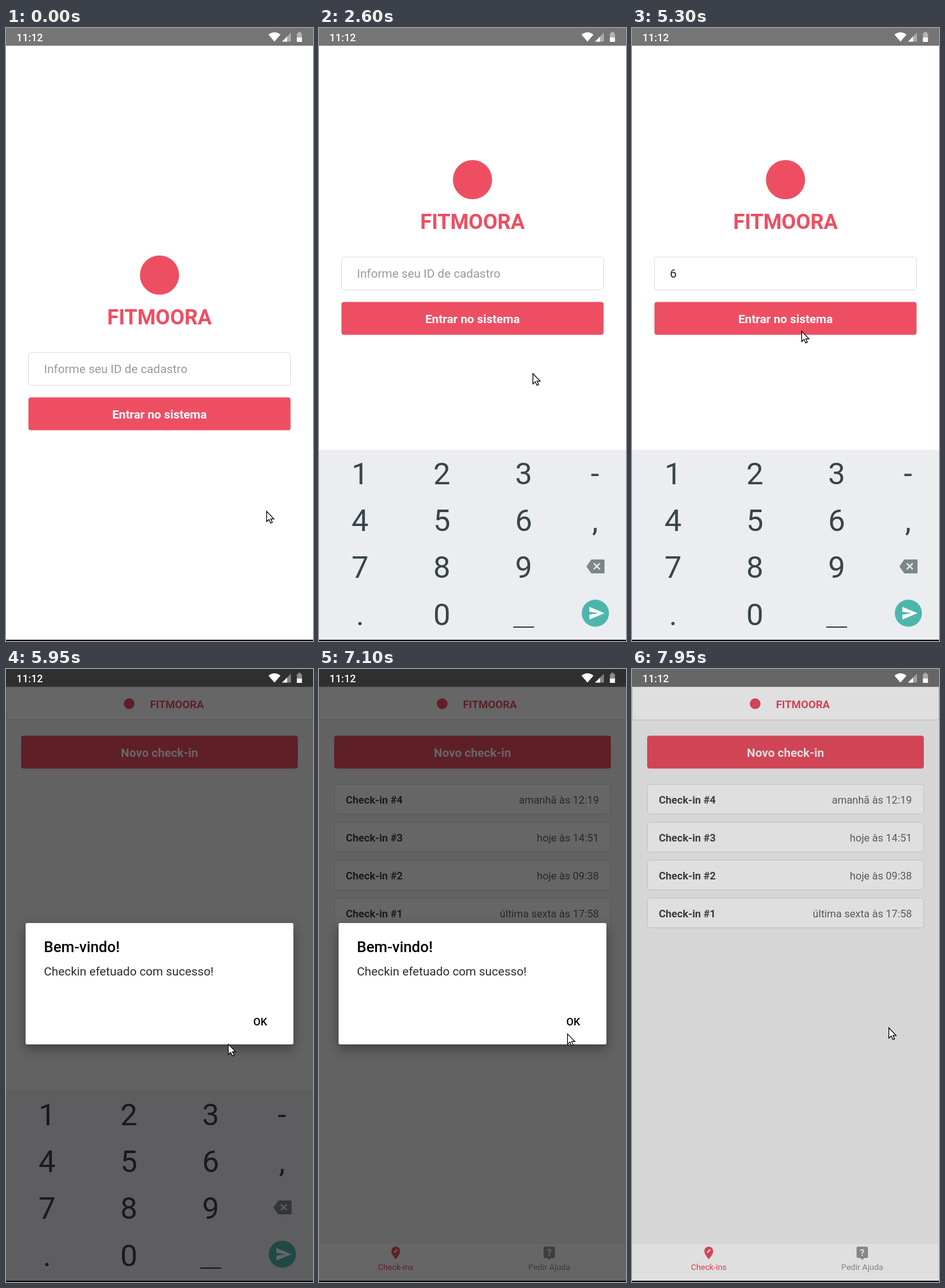
An HTML page for the animation above (8000 ms loop, 486 by 970 pixels).

```html
<!DOCTYPE html>
<html lang="pt-BR">
<head>
<meta charset="utf-8">
<title>Check-in</title>
<style>
  html, body { margin: 0; width: 100%; height: 100%; overflow: hidden; background: #fff; }
  svg { display: block; width: 100%; height: 100%; }
  text { font-family: Roboto, "Noto Sans", sans-serif; font-size: 18.92px; }
  .b { font-weight: 700; }
  .m { font-weight: 500; }
  .mid { text-anchor: middle; }
  .end { text-anchor: end; }
  .red { fill: #ee4e62; }
  .box { fill: #fff; stroke: #ddd; }
  .small { font-size: 16.55px; }
  .tab { font-size: 13px; }
  .key { font-size: 48px; fill: #384548; text-anchor: middle; }
  .shadow { filter: drop-shadow(0 7px 9px rgba(0, 0, 0, .35)); }
</style>
</head>
<body>
<svg viewBox="0 0 486 970" preserveAspectRatio="none">
  <rect width="486" height="970" fill="#fff"/>

  <g id="login">
    <circle class="red" cx="243" cy="391" r="31"/>
    <text class="b mid red" x="243" y="469" style="font-size:33px">FITMOORA</text>
    <rect class="box" x="35.5" y="513.5" width="415" height="52" rx="4"/>
    <text id="hint" x="60" y="546" fill="#999">Informe seu ID de cadastro</text>
    <text id="typed" x="60" y="546" fill="#222">6</text>
    <rect id="caret" y="526" width="2" height="26" fill="#00897b"/>
    <rect class="red" x="35.5" y="584.5" width="415" height="52" rx="4"/>
    <text class="b mid" x="243" y="618" fill="#fff">Entrar no sistema</text>
  </g>

  <g id="home">
    <rect y="28" width="486" height="942" fill="#f5f5f5"/>
    <rect class="box" x=".5" y="28.5" width="485" height="52"/>
    <circle class="red" cx="195" cy="55" r="8.5"/>
    <text class="b red" x="228" y="61.5" style="font-size:17px">FITMOORA</text>
    <rect class="red" x="24" y="105.5" width="438" height="52" rx="4"/>
    <text class="b mid" x="243" y="139" fill="#fff">Novo check-in</text>
    <g id="list"></g>
    <rect y="910" width="486" height="60" fill="#fff"/>
    <path class="red" d="M121.5 934q-7-8-7-13a7 7 0 0 1 14 0q0 5-7 13z"/>
    <path stroke="#fff" stroke-width="2" d="M119 923.500l5-5"/>
    <text class="tab mid red" x="121.5" y="951">Check-ins</text>
    <g fill="#999">
      <rect x="355.5" y="914" width="18" height="18" rx="2"/>
      <path d="M361.500 932h6l-3 3z"/>
      <text class="tab mid" x="364.5" y="951">Pedir Ajuda</text>
    </g>
    <text class="b mid" x="364.5" y="928.500" fill="#fff" style="font-size:15px">?</text>
  </g>

  <g id="keyboard">
    <rect y="667" width="486" height="2" opacity=".04"/>
    <rect y="668" width="486" height="302" fill="#ebedf1"/>
    <g id="keys"></g>
    <rect x="307.5" y="947" width="33" height="2" fill="#384548"/>
    <path fill="#7c8789" stroke="#7c8789" stroke-width="2" stroke-linejoin="round" d="M424.5 852l7-10h19.500v20h-19.500z"/>
    <path stroke="#ebedf1" stroke-width="2.2" d="M435 847l9.500 9.500m0-9.500l-9.500 9.500"/>
    <circle cx="437.5" cy="926" r="21.5" fill="#4db6ac"/>
    <path fill="#fff" d="M428 916l24 10-24 10v-7.800l15-2.200-15-2.200z"/>
  </g>

  <rect width="486" height="28" fill="#757575"/>
  <rect id="dim" width="486" height="970"/>

  <g fill="#fff">
    <text class="m small" x="16.5" y="20.7">11:12</text>
    <path d="M415.500 10.500Q425 3 434.500 10.500L425 21.500z"/>
    <path opacity=".4" d="M437 21.500l14-14v14z"/>
    <path d="M437 21.500l8-8v8z"/>
    <path opacity=".45" d="M460.500 15V8h2V6h4v2h2v7z"/>
    <rect x="460.5" y="15" width="8" height="7"/>
  </g>

  <g id="dialog">
    <rect class="shadow" x="31" y="402" width="424" height="192" rx="2.5" fill="#fff"/>
    <circle id="ripple" cx="407" cy="568" r="21" opacity=".05"/>
    <text class="m" x="60" y="448" style="font-size:23.65px">Bem-vindo!</text>
    <text x="60" y="485" fill="#2b2b2b">Checkin efetuado com sucesso!</text>
    <text class="m small" x="391.5" y="564">OK</text>
  </g>

  <rect y="968" width="486" height="2"/>
  <path id="mouse" fill="#fff" stroke="#000" stroke-width="1.2" d="M.6.8v16.400l3.700-3.500 2.700 5.700 2.700-1.200-2.600-5.400h5z"/>
</svg>

<script>
const LOOP = 8000, STEP = 50;
const FOCUS = 2000, RESIZE = 2250, TYPE = 4400, ENTER = 5700, LOADED = 6200, PRESS_OK = 7650;

const $ = id => document.getElementById(id);
const show = (id, on) => { $(id).style.display = on ? '' : 'none'; };
const move = (id, x, y) => $(id).setAttribute('transform', `translate(${x} ${y})`);
const fade = (id, v) => $(id).setAttribute('opacity', v);

const ramp = (t, from, to) => Math.min(1, Math.max(0, (t - from) / (to - from)));
const smooth = k => k * k * (3 - 2 * k);
const easeOut = k => 1 - (1 - k) ** 2;

$('list').innerHTML = ['amanhã às 12:19', 'hoje às 14:51', 'hoje às 09:38', 'última sexta às 17:58']
  .map((when, i) => `<g transform="translate(0 ${i * 60})">
    <rect class="box" x="24.5" y="182.5" width="437" height="47" rx="4"/>
    <text class="b small" x="42.5" y="213" fill="#444">Check-in #${4 - i}</text>
    <text class="small end" x="443" y="213" fill="#666">${when}</text></g>`).join('');

$('keys').innerHTML = ['123-', '456,', '789', '.0'].map((row, r) =>
  [...row].map((c, i) =>
    `<text class="key" x="${Math.min(65 + i * 129.5, 437)}" y="${722 + r * 74.2}">${c}</text>`).join('')
).join('');

// Pointer moves: begin, end, x, y
const legs = [
  [0, 850, 390, 699],
  [900, 1600, 338, 546],
  [2850, 3650, 367, 751],
  [3800, 4150, 334, 786],
  [4400, 5150, 268, 479],
  [5450, 6050, 358, 602],
  [6150, 7600, 406, 567]
];

function pointer(t) {
  let x = 412, y = 764;
  for (const [from, to, nx, ny] of legs) {
    const k = smooth(ramp(t, from, to));
    x += (nx - x) * k;
    y += (ny - y) * k;
  }
  return [x, y];
}

function pose(t) {
  const typed = t >= TYPE;
  const blink = Math.floor((t - (typed ? TYPE : FOCUS)) / 500) % 2 === 0;

  show('login', t < ENTER);
  show('home', t >= ENTER);
  show('list', t >= LOADED);
  show('hint', !typed);
  show('typed', typed);
  show('caret', t >= FOCUS && blink);
  show('ripple', t >= PRESS_OK);
  $('caret').setAttribute('x', typed ? 71 : 60);
  move('login', 0, t >= RESIZE ? -151 : 0);

  const open = easeOut(ramp(t, 2050, 2300)) - ramp(t, 6000, 6100);
  move('keyboard', 0, 64 * (1 - open));
  fade('keyboard', open);

  const enter = ramp(t, 5800, 5950), leave = ramp(t, 7780, 7995);
  fade('dim', 0.6 * (enter - leave));
  fade('dialog', enter * (1 - leave) ** 4);
  $('dialog').setAttribute('transform', `translate(243 498) scale(${0.9 + 0.1 * enter}) translate(-243 -498)`);

  move('mouse', ...pointer(t));
}

const start = performance.now();
function tick() {
  const t = (performance.now() - start) % LOOP;
  pose(Math.floor(t / STEP) * STEP);
  requestAnimationFrame(tick);
}
pose(0);
requestAnimationFrame(tick);
</script>
</body>
</html>
```
